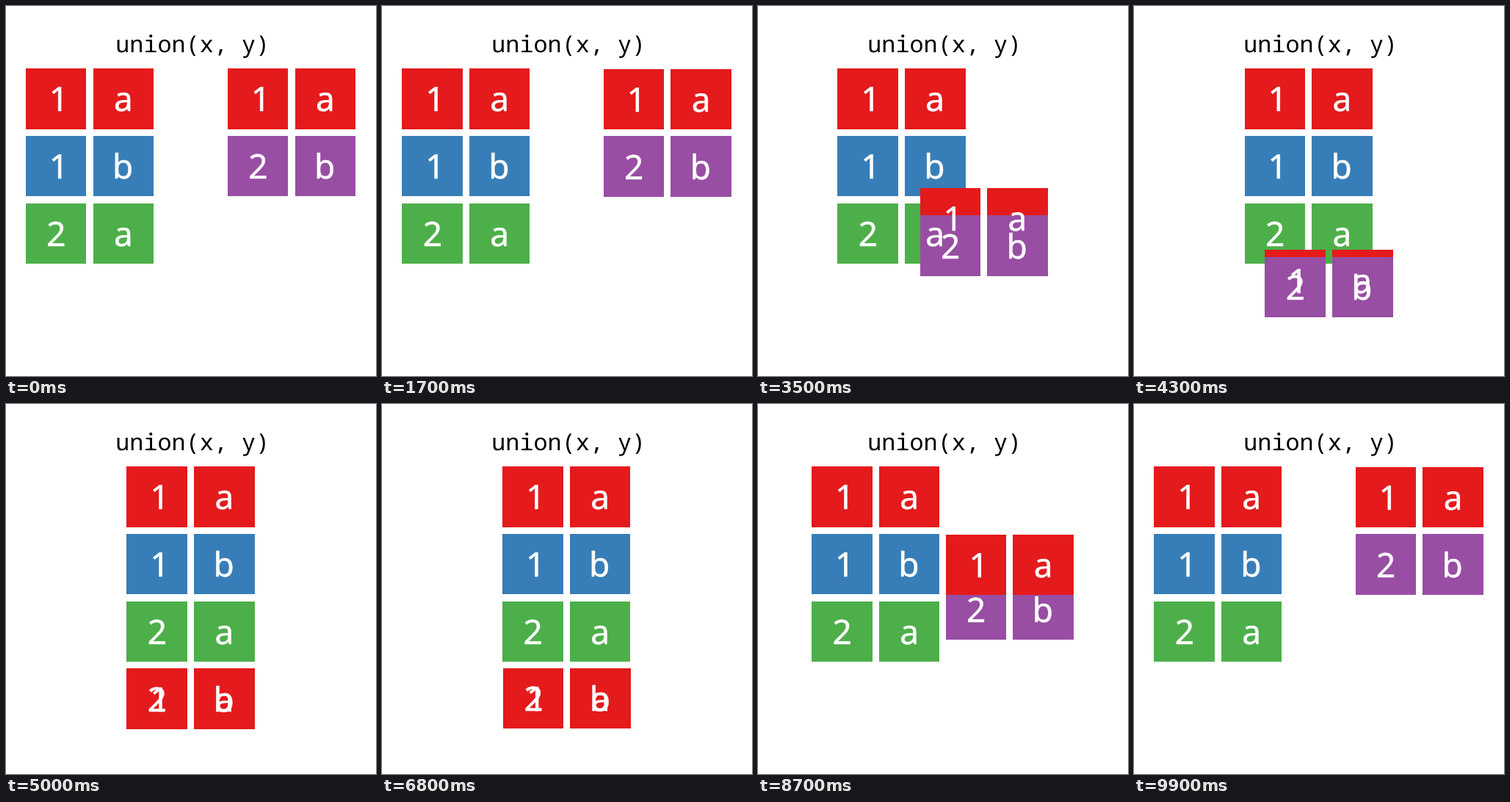
Write an HTML page that moves like this. It is 504 px wide and 504 px high and loops after 10 s.

```html
<!DOCTYPE html>
<html lang="en">
<head>
<meta charset="utf-8">
<title>union(x, y)</title>
<style>
  html, body { margin: 0; width: 100%; height: 100%; overflow: hidden; background: #fff; }
  svg { display: block; width: 100%; height: 100%; }
  rect { shape-rendering: crispEdges; }
  text { text-anchor: middle; text-rendering: geometricPrecision; }
  .title { font: 31.8px "Noto Sans Mono", "DejaVu Sans Mono", monospace; }
  .label { font: 46px "Noto Sans", "Open Sans", sans-serif; fill: #fff; stroke: #fff; stroke-width: 0.5px; }
</style>
</head>
<body>
<svg viewBox="0 0 504 504">
  <text class="title" x="254.2" y="63">union(x, y)</text>
  <g id="tiles"></g>
  <g id="labels"></g>
</svg>
<script>
const LEFT = 26.95, TOP = 85.2, PITCH = 91.67, SIZE = 82.5;
const LOOP = 10000, STEP = 100;
const RED = '#e41a1c', BLUE = '#377eb8', GREEN = '#4daf4a', PURPLE = '#984ea3';

// optical centring of each glyph
const nudge = { 1: 3.8, 2: 0.3, a: 0, b: -0.8 };

// col/row: start cell; dx/dy: travel in cells
const rows = [
  { text: '1a', color: RED, col: 0, row: 0, dx: 1.5, dy: 0 },
  { text: '1b', color: BLUE, col: 0, row: 1, dx: 1.5, dy: 0 },
  { text: '2a', color: GREEN, col: 0, row: 2, dx: 1.5, dy: 0 },
  { text: '1a', color: RED, col: 3, row: 0, dx: -1.5, dy: 3 },
  { text: '2b', color: PURPLE, col: 3, row: 1, dx: -1.5, dy: 2 }
];

const tiles = document.getElementById('tiles');
const labels = document.getElementById('labels');

function add(parent, name, attrs = {}, text = '') {
  const el = document.createElementNS('http://www.w3.org/2000/svg', name);
  for (const key in attrs) el.setAttribute(key, attrs[key]);
  el.textContent = text;
  return parent.appendChild(el);
}

for (const r of rows) {
  r.tile = add(tiles, 'g', { fill: r.color });
  r.label = add(labels, 'g');
  [...r.text].forEach((ch, i) => {
    const x = i * PITCH;
    add(r.tile, 'rect', { x, width: SIZE, height: SIZE });
    add(r.label, 'text', { class: 'label', x: x + SIZE / 2 + nudge[ch], y: 58.3 }, ch);
  });
}

const ease = p => (1 - Math.cos(Math.PI * Math.min(1, Math.max(0, p)))) / 2;

function draw(time) {
  const t = Math.floor(time % LOOP / STEP) * STEP;
  const p = ease((t - 1600) / 3400) - ease((t - 6700) / 3300);

  for (const r of rows) {
    const x = LEFT + (r.col + r.dx * p) * PITCH;
    const y = TOP + (r.row + r.dy * p) * PITCH;
    const move = `translate(${x.toFixed(3)} ${y.toFixed(3)})`;
    r.tile.setAttribute('transform', move);
    r.label.setAttribute('transform', move);
  }

  // the red pair covers the purple one from the merged state on
  const top = rows[t >= 5000 ? 3 : 4].tile;
  if (tiles.lastChild !== top) tiles.appendChild(top);
}

const start = performance.now();
function tick() {
  draw(performance.now() - start);
  requestAnimationFrame(tick);
}
tick();
</script>
</body>
</html>
```
